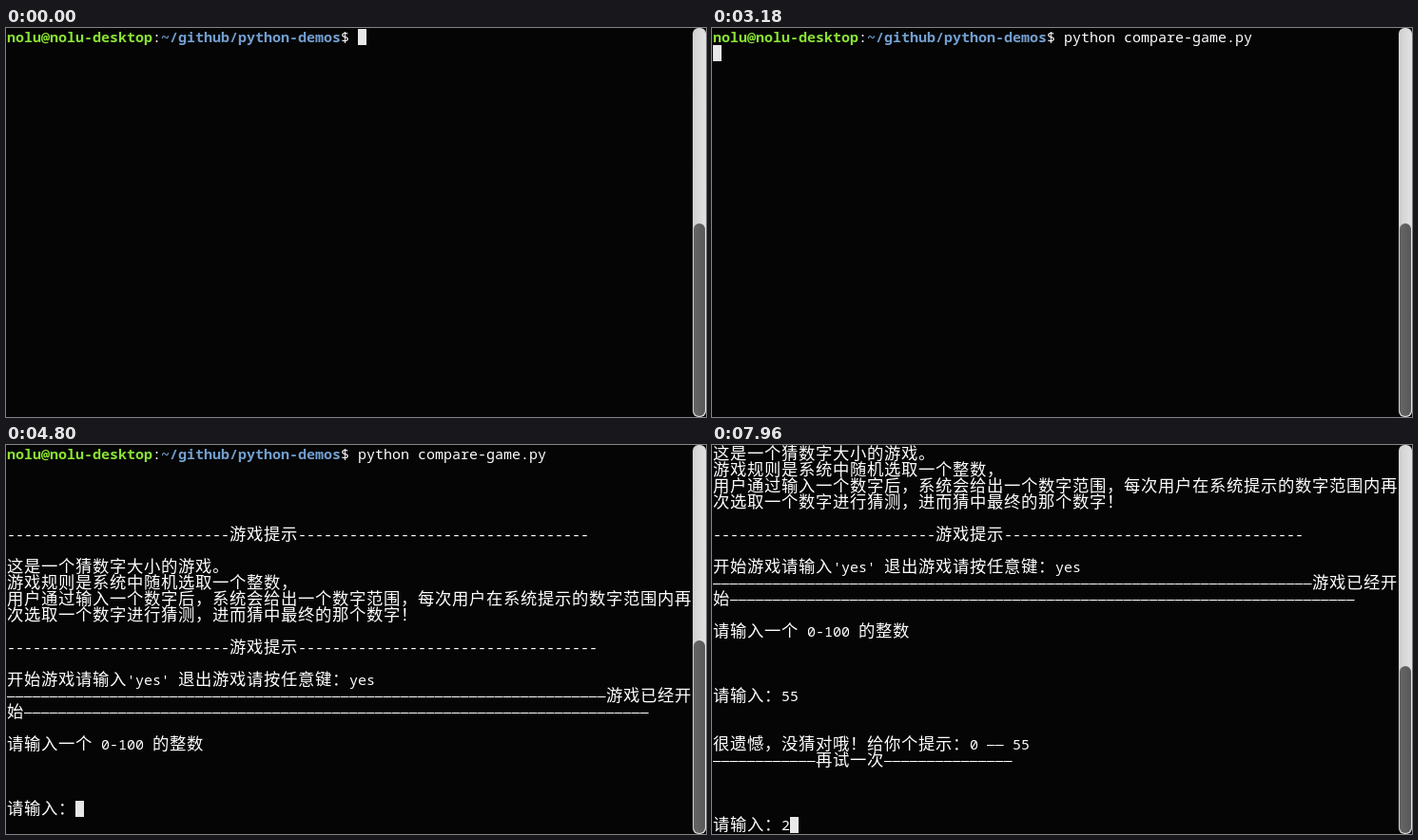
These frames come from a looping animation (736 by 410 pixels, 8000 ms). An HTML page with a canvas:

```html
<!DOCTYPE html>
<html lang="zh-CN">
<head>
<meta charset="utf-8">
<title>Terminal</title>
<style>
html, body { margin: 0; width: 100%; height: 100%; overflow: hidden; background: #050505; }
canvas { display: block; }
</style>
</head>
<body>
<canvas id="stage" width="736" height="410"></canvas>
<script>
const ctx = document.getElementById('stage').getContext('2d');
const LOOP = 8000, CELL = 9, LINE = 17;
const MONO = '"Noto Sans Mono", "DejaVu Sans Mono", monospace';
const LATIN = '15px ' + MONO, BOLD = 'bold 15px ' + MONO;
const HAN = '17.33px "Noto Sans CJK SC", "Noto Sans CJK JP", "Noto Sans CJK", sans-serif';
const WHITE = '#fff', GREEN = '#8ae234', BLUE = '#729fcf';

// Turns , : ! into their full-width forms
const full = s => s.replace(/[,:!]/g, c => String.fromCharCode(c.charCodeAt(0) + 0xfee0));

const command = 'python compare-game.py ';
const title = n => '-'.repeat(26) + '游戏提示' + '-'.repeat(n);
const intro = [
  '', '', '', '',
  title(34),
  '',
  '这是一个猜数字大小的游戏。',
  '游戏规则是系统中随机选取一个整数,',
  '用户通过输入一个数字后,系统会给出一个数字范围,每次用户在系统提示的数字范围内再',
  '次选取一个数字进行猜测,进而猜中最终的那个数字!',
  '',
  title(35),
  '',
  "开始游戏请输入'yes' 退出游戏请按任意键:"
].map(full);
const started = [
  '—'.repeat(70) + '游戏已经开',
  '始' + '—'.repeat(73),
  '',
  '请输入一个 0-100 的整数',
  '', '', '',
  '请输入:'
].map(full);
const retry = [
  '', '',
  '很遗憾,没猜对哦!给你个提示:0 —— 55',
  '—'.repeat(12) + '再试一次' + '—'.repeat(15),
  '', '', '',
  '请输入:'
].map(full);

// Output after the prompt line, with answers already entered
const after = (lines, answer) => [...lines.slice(0, -1), lines.at(-1) + answer];
const round1 = [...after(intro, 'yes'), ...started];
const screens = {
  shell: [],
  run: [''],
  intro,
  round1,
  round2: [...after(round1, '55'), ...retry]
};

// Start time, screen, typed text, cursor shown
const steps = [
  [0, 'shell', '', 1], [100, 'shell', '', 0], [720, 'shell', '', 1],
  ...[[850, 1], [1220, 2], [1620, 3], [1760, 4], [1950, 6], [2350, 7],
    [2510, 8], [2650, 9], [2780, 10], [2930, 23]]
    .map(([t, n]) => [t, 'shell', command.slice(0, n), 1]),
  [3180, 'run', '', 1],
  [3220, 'intro', '', 1], [3740, 'intro', '', 0], [4370, 'intro', '', 1],
  [4460, 'intro', 'y', 1], [4550, 'intro', 'ye', 1], [4640, 'intro', 'yes', 1],
  [4800, 'round1', '', 1], [5370, 'round1', '', 0], [5890, 'round1', '', 1],
  [5960, 'round1', '5', 1], [6030, 'round1', '55', 1],
  [6210, 'round2', '', 1], [6750, 'round2', '', 0], [7370, 'round2', '', 1],
  [7960, 'round2', '2', 1]
];

const isWide = c => c > '\u2fff';

// Draws text cell by cell and returns the next free column
function write(text, col, row, color = WHITE, font = LATIN) {
  const top = 1 + row * LINE;
  ctx.fillStyle = color;
  for (const c of text) {
    const x = 1 + col * CELL;
    if (c === '—') {
      ctx.fillRect(x, top + 9, 8.6, 1);
    } else {
      ctx.font = isWide(c) ? HAN : font;
      ctx.fillText(c, x, top + 14);
    }
    col += isWide(c) ? 2 : 1;
  }
  return col;
}

function prompt(row) {
  let col = write('nolu@nolu-desktop', 0, row, GREEN, BOLD);
  col = write(':', col, row);
  col = write('~/github/python-demos', col, row, BLUE, BOLD);
  return write('$ ', col, row);
}

function bar(x, y, w, h, left, right) {
  const shade = ctx.createLinearGradient(x, 0, x + w, 0);
  shade.addColorStop(0, left);
  shade.addColorStop(1, right);
  ctx.fillStyle = shade;
  ctx.beginPath();
  ctx.roundRect(x, y, w, h, 6);
  ctx.fill();
}

function draw(t) {
  const [, name, typed, cursor] = steps.findLast(s => s[0] <= t);
  const lines = screens[name];
  const scroll = Math.max(0, lines.length - 23);

  ctx.fillStyle = '#050505';
  ctx.fillRect(0, 0, 736, 410);

  let col = 0;
  if (!scroll) {
    col = prompt(0);
    if (lines.length) write(command, col, 0);
  }
  lines.forEach((line, i) => {
    if (i + 1 >= scroll) col = write(line, 0, i + 1 - scroll);
  });
  const row = lines.length - scroll;
  col = write(typed, col, row);
  if (cursor) {
    ctx.fillStyle = '#e8e8e8';
    ctx.fillRect(1 + col * CELL, 1 + row * LINE, CELL, LINE);
  }

  const thumb = t < 6170 ? 206 : 233;
  bar(722, 0, 14, 410, '#d0d0d0', '#e2e2e2');
  bar(723, thumb, 12, 409 - thumb, '#666', '#585858');
}

function frame(now) {
  draw(now % LOOP);
  requestAnimationFrame(frame);
}
requestAnimationFrame(frame);
</script>
</body>
</html>
```
